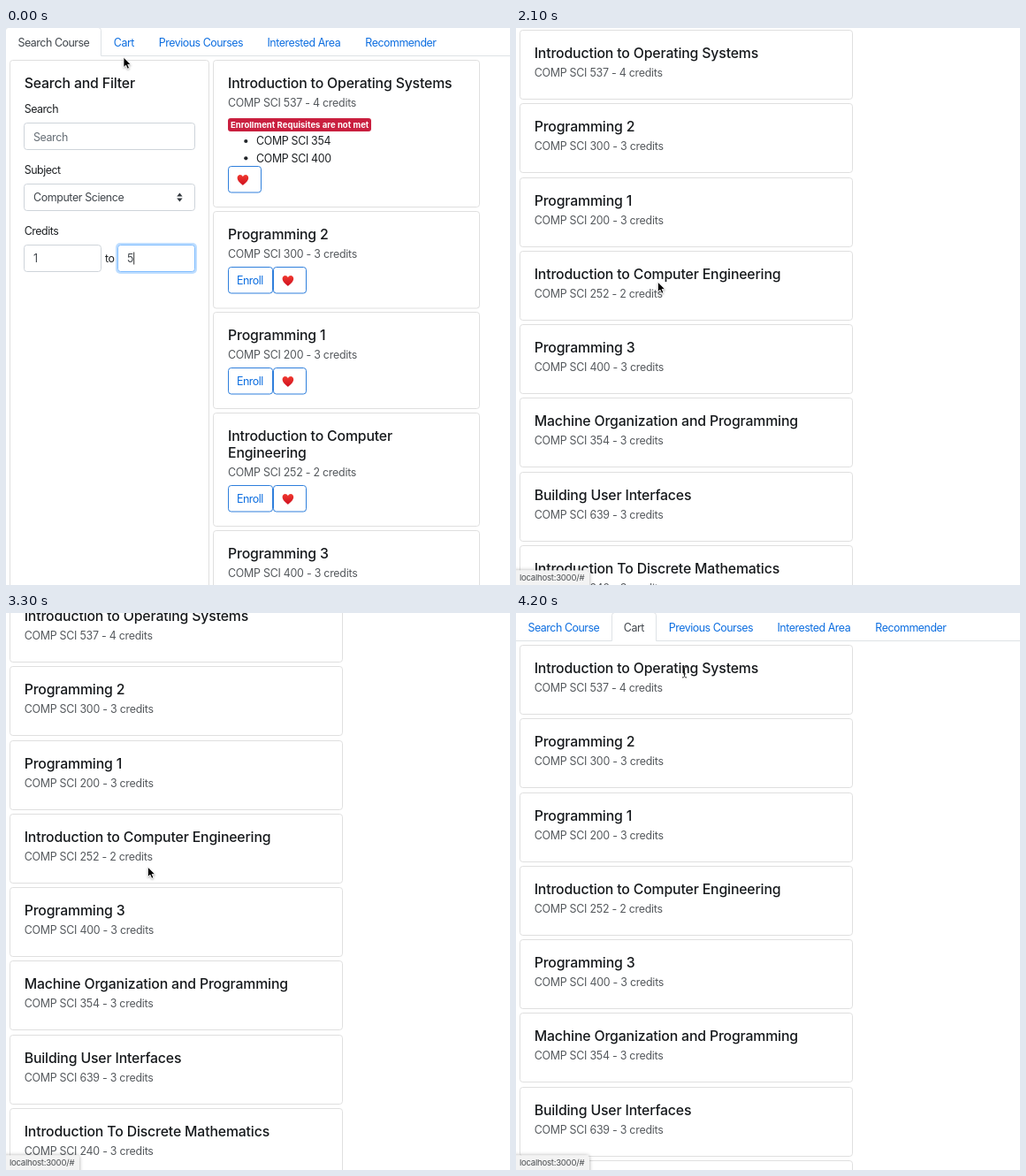
Recreate the animation shown at these times as an HTML page. Size 570 px wide and 630 px high, loop 4.3 s.

```html
<!DOCTYPE html>
<html lang="en">
<head>
<meta charset="utf-8">
<title>Course search and cart</title>
<style>
html, body { margin: 0; width: 570px; height: 630px; overflow: hidden; background: #fff; }
svg { display: block; }
text { font-family: Inter, "Open Sans", sans-serif; font-size: 12.4px; letter-spacing: -.46px; fill: #1d2023; white-space: pre; }
.title { font-size: 15.8px; font-weight: 500; letter-spacing: -.15px; fill: #16191c; }
.sub { letter-spacing: -.24px; fill: #55595d; }
.item { letter-spacing: -.32px; }
.link { fill: #0d6ee0; }
.hover { fill: #0056b3; }
.active { fill: #40464c; }
.field { letter-spacing: -.38px; fill: #40464c; }
.hint { fill: #666e76; }
.badge { font-size: 9.5px; font-weight: 700; letter-spacing: .03px; fill: #fff; }
.status { font-size: 9.6px; letter-spacing: -.26px; fill: #4a4d50; }
.card { fill: #fff; stroke: #dfdfdf; }
.input { fill: #fff; stroke: #ced4da; }
.focus { fill: #fff; stroke: #80bdff; }
.btn { fill: #fff; stroke: #2f7fdc; }
.line { fill: none; stroke: #dee2e6; }
</style>
</head>
<body>
<svg id="stage" width="570" height="630" viewBox="0 0 570 630">
  <defs>
    <linearGradient id="red" x1="0" y1="0" x2="0" y2="1">
      <stop offset="0" stop-color="#f0392f"/><stop offset="1" stop-color="#cf0f1f"/>
    </linearGradient>
    <filter id="soft" x="-20%" y="-60%" width="150%" height="220%">
      <feDropShadow dx="0" dy="0" stdDeviation="2" flood-opacity=".35"/>
    </filter>
    <filter id="lift" x="-50%" y="-50%" width="200%" height="200%">
      <feDropShadow dx="0" dy="1" stdDeviation=".8" flood-opacity=".35"/>
    </filter>
  </defs>
  <g id="page">
    <g id="search"></g>
    <g id="cart"></g>
    <g id="nav"></g>
  </g>
  <g id="status">
    <path d="M-6 636V613.5H79.5Q83 613.5 83 617V636Z" fill="#f3f3f3" filter="url(#soft)"/>
    <text class="status" x="4" y="625.2">localhost:3000/#</text>
  </g>
  <g id="arrow" filter="url(#lift)">
    <path d="M0 0V11.3L2.6 8.9L4.4 13L6.5 12.1L4.7 8.2H8.2Z" fill="#000" stroke="#fff" stroke-width=".8"/>
  </g>
  <g id="hand" filter="url(#lift)">
    <path d="M-1.3 1.2Q-1.3 0 -.1 0Q1.1 0 1.2 1.2L1.7 5Q3.2 4 3.8 5.4Q5.2 4.6 5.8 6Q7.6 5.6 7.8 7.5Q8 10 6.7 12.2V14.5H.4V13.1Q-1.6 11.4 -3.6 8.3Q-4.3 7 -3.3 6.6Q-2.2 6.3 -.6 8Z"
      fill="#fff" stroke="#111" stroke-width="1" stroke-linejoin="round"/>
    <path d="M2.2 8.8V12M4 8.8V12M5.7 8.8V12" stroke="#111" stroke-width=".7"/>
  </g>
  <path id="beam" d="M-2.5 -6Q-.6 -6 0 -4.8Q.6 -6 2.5 -6M0 -4.8V4.8M-2.5 6Q-.6 6 0 4.8Q.6 6 2.5 6M-1.4 1.9H1.4"
    fill="none" stroke="#222" stroke-width="1"/>
</svg>
<script>
const LOOP = 4300, STEP = 100, CLICK = 900;
const NS = 'http://www.w3.org/2000/svg';
const $ = id => document.getElementById(id);

function add(parent, tag, attrs, content) {
  const el = document.createElementNS(NS, tag);
  for (const key in attrs) el.setAttribute(key, attrs[key]);
  if (content) el.textContent = content;
  return parent.appendChild(el);
}
const label = (g, x, y, str, cls = '') => add(g, 'text', { x, y, class: cls }, str);
const box = (g, x, y, width, height, cls) =>
  add(g, 'rect', { x, y, width, height, rx: 3.2, class: cls });

function heart(g, x, y) {
  add(g, 'path', {
    d: 'M0 6.2C-2.4 4.2 -6.3 1.4 -6.3 -2.1C-6.3 -6.2 -1.5 -7 0 -3.5C1.5 -7 6.3 -6.2 6.3 -2.1C6.3 1.4 2.4 4.2 0 6.2Z',
    transform: `translate(${x} ${y})`, fill: 'url(#red)'
  });
}

function buttons(g, y, enroll) {
  const x = enroll ? 302.5 : 251.5;
  if (enroll) {
    box(g, 251.5, y, 50, 29.5, 'btn');
    label(g, 261, y + 19.6, 'Enroll', 'link');
  }
  box(g, x, y, 37, 29.5, 'btn');
  heart(g, x + 16.4, y + 15.2);
}

const courses = [
  ['Introduction to Operating Systems', '537 - 4'],
  ['Programming 2', '300 - 3'],
  ['Programming 1', '200 - 3'],
  ['Introduction to Computer Engineering', '252 - 2'],
  ['Programming 3', '400 - 3'],
  ['Machine Organization and Programming', '354 - 3'],
  ['Building User Interfaces', '639 - 3'],
  ['Introduction To Discrete Mathematics', '240 - 3']
];
const detail = i => `COMP SCI ${courses[i][1]} credits`;

function buildCart(g) {
  courses.forEach(([name], i) => {
    const y = 36.5 + Math.round(83.25 * i);
    box(g, 4.5, y, 376, 78, 'card');
    label(g, 20.7, y + 31.5, name, 'title');
    label(g, 20.7, y + 52.2, detail(i), 'sub');
  });
}

function buildFilter(g) {
  box(g, 4.5, 36.5, 225, 620, 'card');
  label(g, 20.7, 68, 'Search and Filter', 'title');
  label(g, 20.7, 96, 'Search');
  box(g, 20.5, 107.5, 193, 30, 'input');
  label(g, 31, 127.5, 'Search', 'field hint');
  label(g, 20.7, 165, 'Subject');
  box(g, 20.5, 176.5, 193, 30, 'input');
  label(g, 31, 196, 'Computer Science', 'field');
  add(g, 'path', { d: 'M193.2 190.4L196.4 186.4L199.6 190.4ZM193.2 192.4H199.6L196.4 196.4Z', fill: '#343a40' });
  label(g, 20.7, 234, 'Credits');
  box(g, 20.5, 245.5, 87, 30, 'input');
  label(g, 31, 265, '1', 'field');
  label(g, 112, 264.5, 'to');
  add(g, 'rect', { x: 124, y: 243, width: 92, height: 35, rx: 5, fill: '#bfdeff' });
  box(g, 126.5, 245.5, 87, 30, 'focus');
  label(g, 137, 265, '5', 'field');
  add(g, 'rect', { id: 'caret', x: 144.2, y: 253.5, width: 1, height: 14, fill: '#333' });
}

function buildResults(g) {
  const rows = [[36.5, 166], [207.5, 109.5], [321.5, 109], [435.5, 128], [568.5, 90]];
  rows.forEach(([y, h], i) => {
    const wrap = i === 3;
    const base = y + 31.5, extra = wrap ? 19 : 0;
    box(g, 234.5, y, 301, h, 'card');
    label(g, 251, base, wrap ? 'Introduction to Computer' : courses[i][0], 'title');
    if (wrap) label(g, 251, base + extra, 'Engineering', 'title');
    label(g, 251, base + extra + 21, detail(i), 'sub');
    if (i) buttons(g, y + extra + 63, true);
  });
  add(g, 'rect', { x: 251, y: 102, width: 162, height: 15, rx: 3, fill: '#c91f3f' });
  label(g, 254, 113, 'Enrollment Requisites are not met', 'badge');
  ['354', '400'].forEach((num, i) => {
    add(g, 'circle', { cx: 271.3, cy: 128 + 19.3 * i, r: 2.1, fill: '#212529' });
    label(g, 283, 132.3 + 19.3 * i, 'COMP SCI ' + num, 'item');
  });
  buttons(g, 156.5, false);
}

const tabs = [];
let tabLine;
function buildNav(g) {
  tabLine = add(g, 'path', { class: 'line' });
  [['Search Course', 13.5], ['Cart', 121.8], ['Previous Courses', 172.7],
   ['Interested Area', 295.5], ['Recommender', 406.3]]
    .forEach(([name, x]) => tabs.push(label(g, x, 20.5, name, 'link')));
}

buildFilter($('search'));
buildResults($('search'));
buildCart($('cart'));
buildNav($('nav'));

// Each key is [time, value, ...]; values run between keys.
const scrollKeys = [[1900, 0], [2000, 3], [2100, 34], [2200, 55], [2300, 67], [2400, 73],
  [2500, 75], [2600, 75], [2700, 74], [2900, 72], [3100, 72], [3200, 69], [3300, 59],
  [3400, 36], [3500, 15], [3600, 2], [3700, -3], [3800, -3], [4100, 0]];
const pointerKeys = [[0, 133, 33.2], [500, 130.5, 19.3], [1500, 130.5, 19.3],
  [1900, 160.4, 287.2], [3700, 160.4, 287.2], [4200, 190.5, 67]];

function sample(keys, t, ease = u => u) {
  if (t <= keys[0][0]) return keys[0].slice(1);
  for (let i = 1; i < keys.length; i++) {
    const a = keys[i - 1], b = keys[i];
    if (t <= b[0]) {
      const u = ease((t - a[0]) / (b[0] - a[0]));
      return a.slice(1).map((v, k) => v + (b[k + 1] - v) * u);
    }
  }
  return keys[keys.length - 1].slice(1);
}
const smooth = u => u * u * (3 - 2 * u);
const show = (el, on) => el.setAttribute('visibility', on ? 'visible' : 'hidden');

function draw(t) {
  const inCart = t >= CLICK;
  const [scroll] = sample(scrollKeys, t);
  $('page').setAttribute('transform', `translate(0 ${-Math.round(scroll)})`);
  $('search').style.display = inCart ? 'none' : '';
  $('cart').style.display = inCart ? '' : 'none';
  show($('caret'), t < 500);

  const [left, right] = inCart ? [108.5, 158.5] : [-.5, 107.5];
  tabLine.setAttribute('d', `M-5 31.5H${left}V2.7Q${left} -.5 ${left + 3.2} -.5H${right - 3.2}Q${right} -.5 ${right} 2.7V31.5H575`);

  const [x, y] = sample(pointerKeys, t, smooth);
  const kind = t >= 4100 ? 'beam' : y < 31 ? 'hand' : 'arrow';
  tabs.forEach((tab, i) => {
    const active = i === (inCart ? 1 : 0);
    tab.setAttribute('class', active ? 'active' : i === 1 && kind === 'hand' ? 'hover' : 'link');
  });
  for (const id of ['arrow', 'hand', 'beam']) {
    show($(id), id === kind);
    $(id).setAttribute('transform', `translate(${x} ${y})`);
  }
  $('status').setAttribute('opacity', Math.max(0, Math.min(1, (t - 200) / 200)));
}

function tick() {
  const t = performance.now() % LOOP;
  draw(Math.floor(t / STEP) * STEP);
  requestAnimationFrame(tick);
}
tick();
</script>
</body>
</html>
```
